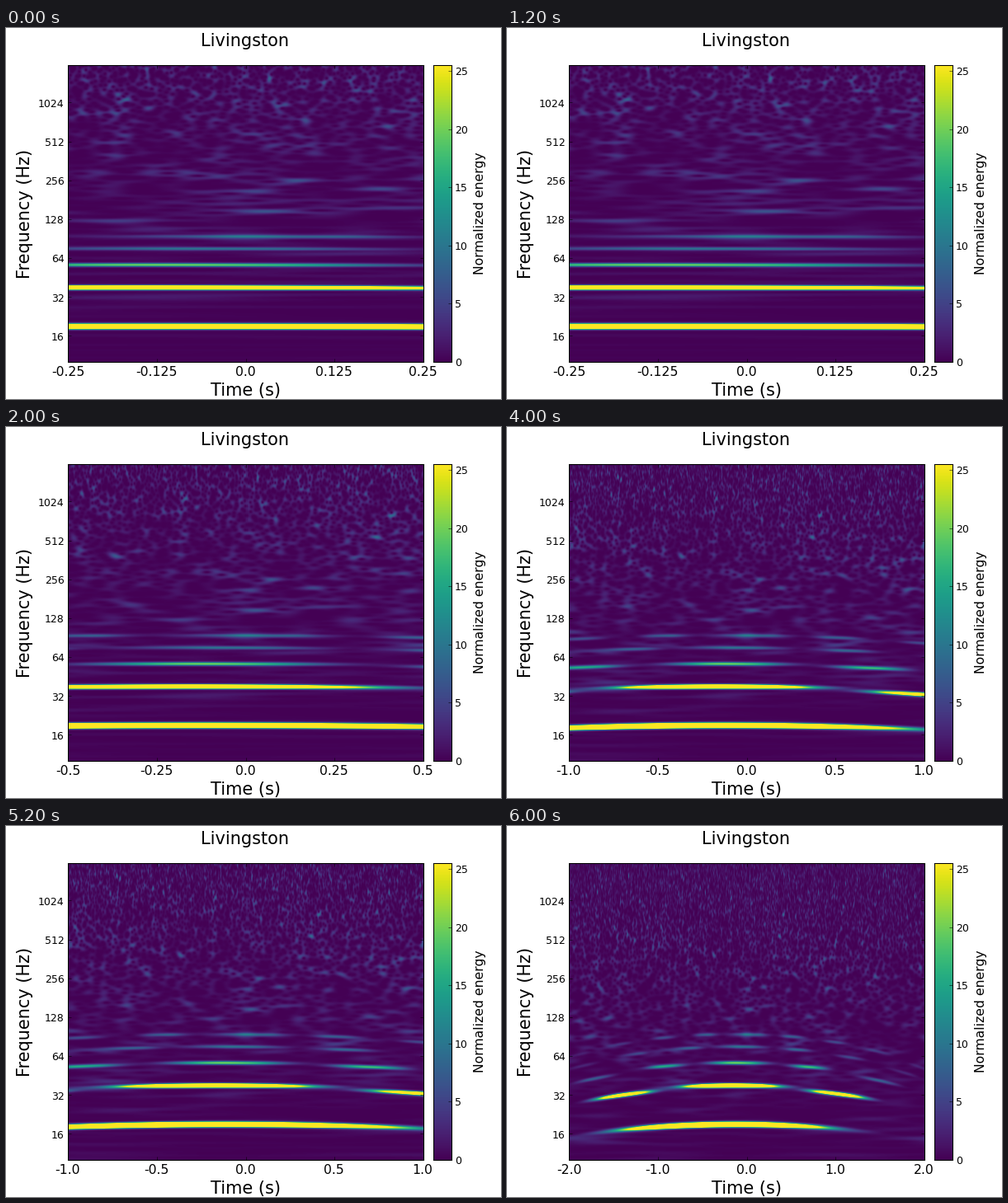
A matplotlib script for the animation above (8000 ms loop, 600 by 450 pixels).

```python
import numpy as np
import matplotlib.pyplot as plt
from matplotlib.animation import FuncAnimation

W, H, DPI = 600, 450, 75
LEFT, TOP, COLS, ROWS = 75, 45, 430, 360
F_MIN, F_MAX, V_MAX = 10, 2000, 25.5
RATE, SPAN = 4300, 4          # samples per second, seconds
HALF_SPANS = [0.25 * 2 ** i for i in range(4)]
PEAKS = [110, 80, 20, 9, 8]   # energy of each harmonic

octave = ROWS / np.log2(F_MAX / F_MIN)
rows = TOP + 0.5 + np.arange(ROWS)


def freq_y(freq):
    return TOP + ROWS - octave * np.log2(freq / F_MIN)


def arch(t):
    """Fundamental frequency, rising and falling around its top."""
    return 18.85 - 1.9 * (t + 0.15) ** 2


def noise_energy():
    """Constant-Q energy of white noise, one row per pixel."""
    n = RATE * SPAN
    rng = np.random.default_rng(7)
    spectrum = np.fft.fft(rng.standard_normal(n))
    freqs = np.fft.fftfreq(n, 1 / RATE)
    centres = F_MIN * 2 ** ((TOP + ROWS - rows) / octave)
    energy = np.empty((ROWS, n), np.float32)
    for i, f in enumerate(centres):
        window = np.exp(-0.5 * ((freqs - f) / (0.034 * f)) ** 2)
        power = np.abs(np.fft.ifft(spectrum * window)) ** 2
        expected = np.sum(window ** 2) / n
        level = np.clip(0.15 * np.log2(f) - 0.35, 0.4, 1)
        energy[i] = level * power / expected
    return energy


def harmonic_energy(t):
    """Harmonic n of the arch shows as 2n - 1 evenly spaced bursts."""
    total = np.zeros((ROWS, t.size))
    for n, peak in enumerate(PEAKS, 1):
        middle = 0.07 * n - 0.32
        thickness = 1.8 + 0.7 / n
        for k in range(1 - n, n):
            centre = middle + 2.4 * k / n
            width = 0.92 / n * (0.65 if k else 1)
            strength = peak * np.exp(-((centre - middle) / 1.6) ** 2)
            d = t - centre
            path = freq_y(n * arch(centre + 0.75 * d))
            total += (strength * np.exp(-np.abs(d / width) ** 2.5)
                      * np.exp(-((rows[:, None] - path) / thickness) ** 2))
    return total


noise = noise_energy()


def spectrogram(half):
    mid, reach = noise.shape[1] // 2, int(half * RATE)
    part = noise[:, mid - reach:mid + reach]
    t = ((np.arange(COLS) + 0.5) / COLS * 2 - 1) * half
    return part.reshape(ROWS, COLS, -1).mean(axis=2) + harmonic_energy(t)


images = [spectrogram(half) for half in HALF_SPANS]

plt.rcParams["font.family"] = "DejaVu Sans"
fig = plt.figure(figsize=(W / DPI, H / DPI), dpi=DPI, facecolor="white")


def panel(x, width, data, extent):
    ax = fig.add_axes([x / W, 1 - (TOP + ROWS) / H, width / W, ROWS / H])
    image = ax.imshow(data, cmap="viridis", vmin=0, vmax=V_MAX, aspect="auto",
                      extent=extent, interpolation="nearest")
    ax.tick_params(direction="in", length=4, width=0.5, top=True, right=True,
                   labelleft=False, labelbottom=False)
    return ax, image


def label(x, y, text, size, ha="center", va="baseline", rotation=0):
    return fig.text(x / W, 1 - y / H, text, size=size, ha=ha, va=va,
                    rotation=rotation)


plot, image = panel(LEFT, COLS + 1, images[0], (0, 4, TOP + ROWS, TOP))
bands = [2 ** i for i in range(4, 11)]
plot.set_xticks(range(5))
plot.set_yticks([freq_y(f) for f in bands])
for f in bands:
    label(70.5, freq_y(f) + 0.6, str(f), 12, "right", "center_baseline")

ramp = np.linspace(V_MAX, 0, 256)[:, None]
bar, _ = panel(518, 22, ramp, (0, 1, 0, V_MAX))
bar.tick_params(left=False, top=False, bottom=False)
bar.set_yticks(range(0, 26, 5))
for v in range(0, 26, 5):
    y = TOP + ROWS * (1 - v / V_MAX)
    label(543.8, y, str(v), 12, "left", "center_baseline")
for ax in (plot, bar):
    ax.spines[:].set_linewidth(1)

label(290, 22, "Livingston", 20)
label(290, 446, "Time (s)", 20)
label(23.5, 225, "Frequency (Hz)", 20, va="center", rotation=90)
label(574, 225, "Normalized energy", 15, va="center", rotation=90)
time_labels = [label(LEFT + i * COLS / 4, 421.5, "", 15) for i in range(5)]


def update(i):
    image.set_data(images[i])
    for j, item in enumerate(time_labels):
        item.set_text(str(HALF_SPANS[i] * (j - 2) / 2))
    return [image, *time_labels]


anim = FuncAnimation(fig, update, frames=len(images), interval=2000,
                     repeat=True, repeat_delay=0)
plt.show()
```
